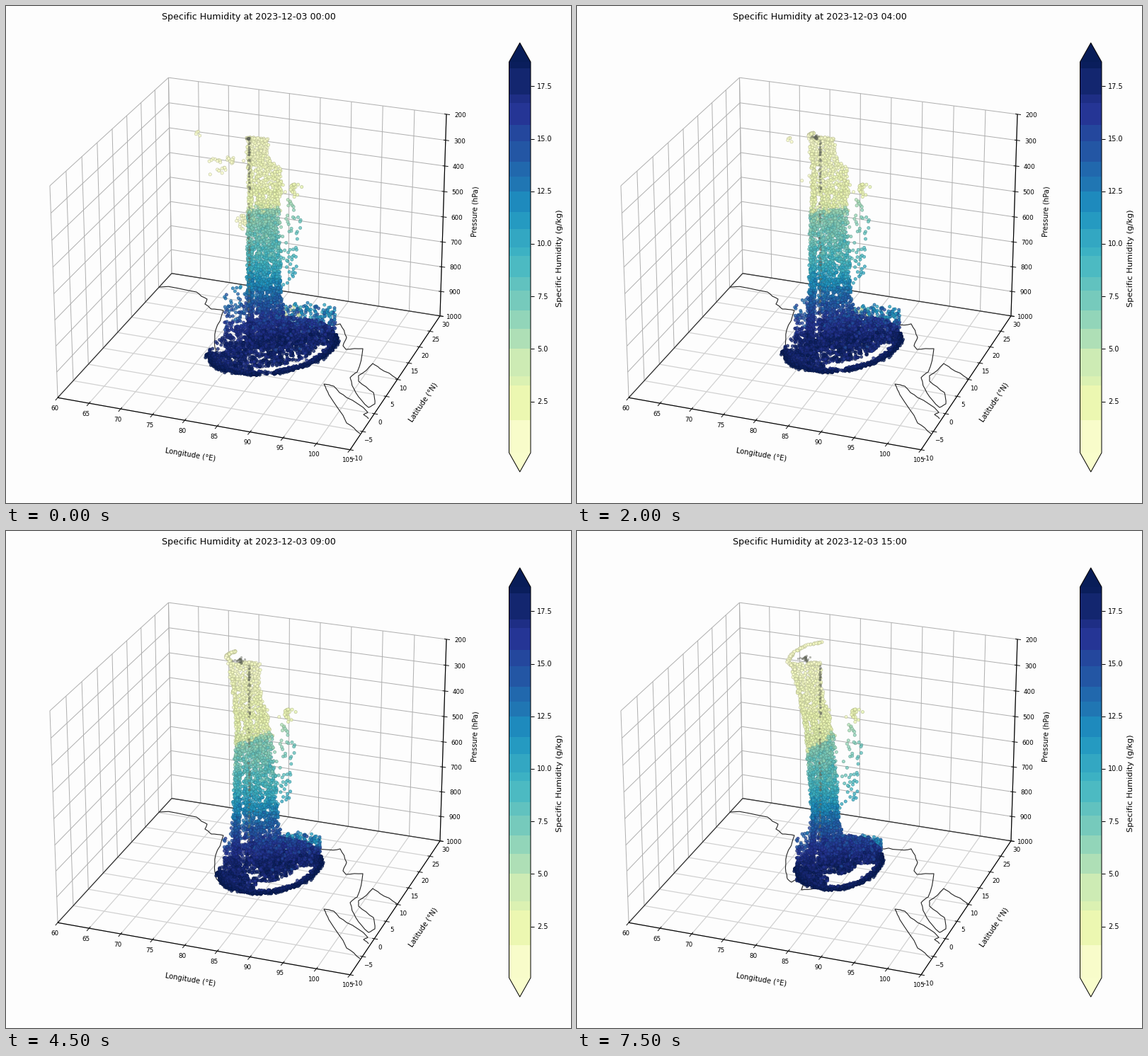
A matplotlib script that plays this animation: 798x702 px, repeating every 8000 ms.

```python
import numpy as np
import matplotlib.pyplot as plt
from matplotlib.animation import FuncAnimation

W, H, DPI = 798, 702, 64
PT = 72 / DPI  # points per pixel
HOURS, STEP = 16, 500
QMAX = 18.66
INK, GRID, FLOOR = "#111111", "#b0b0b0", "#d0d0d0"

fig = plt.figure(figsize=(W / DPI, H / DPI), dpi=DPI, facecolor="#fdfdfd")
ax = fig.add_axes([0, 0, 1, 1])
ax.set(xlim=(0, W), ylim=(H, 0))
ax.axis("off")
cmap = plt.get_cmap("YlGnBu")
rng = np.random.default_rng(12)


def shade(q):
    return cmap(np.clip(np.asarray(q) / QMAX, 0, 1))


def line(pts, color=INK, lw=1.0, z=1):
    x, y = np.transpose(pts)
    ax.plot(x, y, color=color, lw=lw * PT, zorder=z, solid_capstyle="butt")


def label(x, y, s, size, **kw):
    opts = dict(ha="center", va="center", color="black") | kw
    return ax.text(x, y, s, fontsize=size * PT, **opts)


# ---- perspective fitted to the seven visible corners of the box ----
def fit_camera(cube, pix):
    rows = []
    for p, (u, v) in zip(cube, np.array(pix) / 100):
        h = np.array([*p, 1.0])
        rows.append(np.r_[h, np.zeros(4), -u * h])
        rows.append(np.r_[np.zeros(4), h, -v * h])
    return np.linalg.svd(np.array(rows))[2][-1].reshape(3, 4)


CAM = fit_camera(
    [(0, 1, 1), (0, 0, 1), (1, 1, 1), (0, 1, 0), (0, 0, 0), (1, 1, 0), (1, 0, 0)],
    [(229.5, 101), (62, 254), (622, 153), (234, 378), (73, 553), (613, 437.5), (486, 627)])


def project(lon, lat, hpa):
    c = CAM @ [(lon - 60) / 45, (lat + 10) / 40, (1000 - hpa) / 800, 1]
    return c[:2] / c[2] * 100


def seg(p, q, *style, **kw):
    line([project(*p), project(*q)], *style, **kw)


LONS, LATS, HPAS = range(60, 106, 5), range(-10, 31, 5), range(200, 1001, 100)
for lon in LONS:
    seg((lon, 30, 200), (lon, 30, 1000), GRID)
    seg((lon, -10, 1000), (lon, 30, 1000), FLOOR, 1.2, z=0)
for lat in LATS:
    seg((60, lat, 200), (60, lat, 1000), GRID)
    seg((60, lat, 1000), (105, lat, 1000), FLOOR, 1.2, z=0)
for p in HPAS:
    seg((60, 30, p), (105, 30, p), GRID)
    seg((60, -10, p), (60, 30, p), GRID)
seg((60, 30, 1000), (105, 30, 1000), "#333333", 1.3)
seg((60, -10, 1000), (60, 30, 1000), "#333333", 1.2)
seg((60, -10, 1000), (105, -10, 1000), "black", 1.2)
seg((105, -10, 1000), (105, 30, 1000), "black", 1.2)
seg((105, 30, 1000), (105, 30, 200), "black", 1.2)


def tick(at, outward, text, shift):
    d = np.array(outward) / np.hypot(*outward)
    line([at - 3 * d, at + 5 * d])
    label(*(at + shift), text, 8.8)


for lon in LONS:
    tick(project(lon, -10, 1000), (-0.65, 0.76), f"{lon}", (-4, 15))
for lat in LATS:
    tick(project(105, lat, 1000), (0.98, 0.17), f"{lat}".replace("-", "−"), (8, 12.5))
for p in HPAS:
    tick(project(105, 30, p), (0.99, 0.13), f"{p}", (19.5, 1.5))

label(260.5, 634, "Longitude (°E)", 10, rotation=-9.5)
label(589, 560, "Latitude (°N)", 10, rotation=56)
label(663, 290, "Pressure (hPa)", 10, rotation=88)
title = label(342.5, 19, "", 12.65, va="baseline")


# ---- coastlines on the floor, roughened between a few points ----
def coast(*pts):
    pts = np.array(pts, float)
    for rough in (0.07, 0.06):
        d = np.diff(pts, axis=0)
        bump = rng.uniform(-rough, rough, (len(d), 1)) * d[:, ::-1] * (-1, 1)
        mid = pts[:-1] + d / 2 + bump
        out = np.empty((2 * len(pts) - 1, 2))
        out[::2], out[1::2] = pts, mid
        pts = out
    line(pts, "#222222", 1.1)


coast((216, 397), (269, 404), (284, 414), (281, 421), (290, 428), (307, 430),
      (296, 458), (295, 482), (297, 491), (303, 496), (318, 485))
coast((320, 499), (317, 507), (335, 505))
coast((428, 449), (452, 450), (472, 449), (481, 468), (476, 480), (480, 485), (504, 484),
      (496, 517), (486, 525), (494, 546), (512, 567), (521, 562), (519, 546), (498, 530),
      (498, 522), (518, 505), (528, 512), (553, 527))
coast((500, 604), (481, 589), (456, 549), (449, 534), (463, 537), (481, 553),
      (511, 574), (505, 577), (512, 583))

# ---- colour bar ----
X0, X1, XM = 710.5, 741, 725.75
BANDS = [631, 585, 536, 523, 484, 456, 430, 402, 383, 353, 341, 315, 291, 262, 241,
         220, 191, 168, 137, 125, 88, 79]


def q_at(y):
    return 2.5 + (558.5 - y) / 29.67


for lo, hi in zip(BANDS, BANDS[1:]):
    q = max(q_at((lo + hi) / 2), 0.9)
    ax.fill([X0, X1, X1, X0], [lo, lo, hi, hi], color=shade(q), lw=0)
ax.fill([X0, XM, X1], [79, 52, 79], color=shade(QMAX), lw=0)
ax.fill([X0, XM, X1], [631, 658, 631], color=shade(0.75), lw=0)
line([(X0, 79), (XM, 52), (X1, 79), (X1, 631), (XM, 658), (X0, 631), (X0, 79)], "black", z=3)
for k in range(1, 8):
    y = 558.5 - (k - 1) * 74.17
    line([(X1, y), (X1 + 4.5, y)], "black")
    label(750, y + 0.5, f"{2.5 * k:.1f}", 9.7, ha="left")
label(782, 356.5, "Specific Humidity (g/kg)", 11.4, rotation=90)

# ---- outline of the column: left and right edge by height and hour ----
KEYS = [0, 5, 9, 15]
EDGE_Y = [188, 212, 232, 290, 400, 480]
LEFT = np.array([[342] * 6,
                 [326, 328, 329, 327, 326, 318],
                 [315, 319, 321, 325, 322, 319],
                 [302, 309, 313, 324, 333, 327]])
RIGHT = np.array([[370, 368, 390, 386, 388, 400],
                  [361, 364, 382, 381, 386, 398],
                  [359, 357, 361, 376, 384, 395],
                  [344, 344, 348, 363, 369, 385]])
# wisp that curls away from the top
HOOK = np.array([[(342, 187)] * 5,
                 [(324, 170), (318, 172), (313, 175), (312, 178), (316, 184)],
                 [(346, 157), (325, 161), (305, 172), (298, 184), (308, 196)]])


def blend(keys, rows, t):
    i = min(np.searchsorted(keys, t, side="right") - 1, len(keys) - 2)
    f = (t - keys[i]) / (keys[i + 1] - keys[i])
    return rows[i] * (1 - f) + rows[i + 1] * f


def cloud(n):
    return rng.random(n), rng.random(n), rng.normal(size=n)


N_TOP, N_COL = 720, 2200
col_u, col_v, col_n = cloud(N_TOP + N_COL)
col_y = np.r_[187 + 104 * col_v[:N_TOP], 288 + 195 * col_v[N_TOP:]]
strand = rng.random(col_u.size) < 0.28
col_u = np.where(strand, 0.13 * col_u, 0.2 + 0.8 * col_u)
col_j = rng.normal(0, 1.3, col_u.size)


def column(t):
    left = np.interp(col_y, EDGE_Y, blend(KEYS, LEFT, t))
    right = np.interp(col_y, EDGE_Y, blend(KEYS, RIGHT, t))
    split = 285 + 26 * (1 - col_u) * t / 15 + 3 * col_n
    dry = np.interp(col_y, [186, 290], [0.9, 2.7]) + 0.3 * col_n
    wet = np.interp(col_y, [290, 350, 385, 410, 440, 475],
                    [6.4, 8.4, 11, 13.4, 16, 18]) + 0.6 * col_n
    return left + col_u * (right - left) + col_j, col_y, np.where(col_y < split, dry, wet)


def disc_shape(t):
    return 376 - 0.4 * t, 480 - 0.8 * t, 91 - 2.0 * t, 39 - 0.1 * t


def on_disc(t, th, r):
    cx, cy, a, b = disc_shape(t)
    dx = a * r * np.cos(th)
    return cx + dx, cy + b * r * np.sin(th) - 0.12 * dx


rim_u, rim_v, rim_n = cloud(620)
rim_th = np.radians(-8 + 188 * rim_u)


def rim(t):
    x, y = on_disc(t, rim_th, 0.97 + 0.035 * rim_n)
    keep = abs(x - 369 - 0.9 * t) > 9 - 0.85 * t
    return x[keep], y[keep], 18.2 + 0.4 * rim_n[keep]


in_u, in_v, in_n = cloud(1900)
in_deg, in_r = 360 * in_u, np.sqrt(in_v)


def inside(t):
    x, y = on_disc(t, np.radians(in_deg), in_r)
    eye = max(0, min(2 * (t - 3), 11))
    in_eye = np.hypot(x - 343 - 1.5 * (t - 5), (y - 481) * 1.2) < eye
    slot = (in_r > 0.75 - 0.02 * t) & (in_r < 0.9) & (in_deg > 15) & (in_deg < 112)
    bare = (in_deg > 182) & (in_deg < 245) & (in_r > 0.5) & (abs(in_n) > 0.3)
    keep = ~(in_eye | slot | bare)
    q = np.interp(y, [435, 470], [15.2, 17.6]) + 0.8 * in_n
    return x[keep], y[keep], q[keep]


lobe_u, lobe_v, lobe_n = cloud(430)


def lobe(t):
    cx, _, a, _ = disc_shape(t)
    top = 414 + 0.8 * t + 16 * abs(lobe_u - 0.55)
    y = top + (478 - t - top) * lobe_v ** 0.75
    q = np.interp(y, [415, 440, 468], [11, 12.6, 17]) + 1.3 * lobe_n
    q = np.where((lobe_u < 0.3) & (y < 440) & (lobe_n < -0.2) & (t < 8), 3.5, q)
    return cx + a * (0.2 + 0.78 * lobe_u), y, q


spire_u, spire_v, spire_n = cloud(240)


def spires(t):
    cx, _, a, _ = disc_shape(t)
    top = 396 + 30 * min(t / 7, 1)
    y = top + (497 - top) * spire_v ** 0.6
    off = -0.74 - 0.24 * t / 15 + 0.36 * spire_u
    return cx + a * off, y, np.interp(y, [395, 430, 475], [12.5, 14.2, 17.4]) + 0.6 * spire_n


hook_u, hook_v, hook_n = cloud(80)


def hook(t):
    pts = blend([0, 9, 15], HOOK, t)
    s = 4 * hook_u
    x, y = (np.interp(s, range(5), pts[:, k]) for k in (0, 1))
    return x + 0.8 * hook_n, y + 1.6 * (hook_v - 0.5), 1 + 0.3 * hook_n


row_u, _, row_n = cloud(40)


def top_row(t):
    x0, x1 = 342 - 1.1 * t, RIGHT[0, 0] - 1.7 * t
    x = x0 + row_u * (x1 - x0)
    return x, 187 + 0.8 * row_n + 0.15 * (x - 350) * (1 - t / 15), 1 + 0.2 * row_n


# x, y, spread x, spread y, count, last hour
STRAYS = [(272, 182, 2, 2, 5, 6), (290, 238, 1, 1, 1, 5), (313, 218, 12, 2, 22, 3),
          (305, 231, 4, 3, 8, 5), (334, 305, 3, 6, 24, 2)]
stray = np.array([(x + sx * rng.normal(), y + sy * rng.normal(), last)
                  for x, y, sx, sy, n, last in STRAYS for _ in range(n)])


def strays(t):
    x, y, last = stray[stray[:, 2] >= t].T
    return np.minimum(x + 40 * (1 - np.exp(-t / 3)), 342), y + 2.2 * t, np.full(x.size, 0.9)


out_u, out_v, out_n = cloud(78)


def outliers(t):
    y = 252 + 155 * out_v ** 1.5
    x = 404 - 0.95 * t + 6 * out_n - 0.03 * (y - 300) - 0.8 * t * (y > 380)
    q = np.where(y < 272, 2, np.interp(y, [272, 350, 405], [5.8, 8.5, 11]))
    return x, y, q + 0.4 * out_n


PARTS = [strays, outliers, spires, lobe, column, top_row, hook, inside, rim]

# thin dark core line and the grey knot at the top
core_y = np.r_[rng.uniform(190, 262, 38), rng.uniform(262, 440, 40)]
core_x = rng.normal(343, 0.5, core_y.size)
knot = rng.normal(size=(26, 2)) * (3, 1.8)

dots = ax.scatter([], [], s=(4.2 * PT) ** 2, linewidths=0.6 * PT, zorder=5)
marks = ax.scatter([], [], s=(2.4 * PT) ** 2, linewidths=0.5 * PT, zorder=6,
                   facecolors=[(0.55, 0.56, 0.48, 0.45)],
                   edgecolors=[(0.25, 0.27, 0.25, 0.55)])


def draw(t):
    x, y, q = (np.concatenate(v) for v in zip(*(part(t) for part in PARTS)))
    face = shade(q)
    edge = face.copy()
    edge[:, :3] *= 0.74
    face[:, 3], edge[:, 3] = 0.78, 0.85
    dots.set_offsets(np.c_[x, y])
    dots.set_facecolor(face)
    dots.set_edgecolor(edge)

    center = np.array([342 - 1.35 * t, 187 - 0.45 * t])
    size = min(1, 0.3 + t / 12)
    marks.set_offsets(np.r_[np.c_[core_x, core_y], center + knot * size])
    title.set_text(f"Specific Humidity at 2023-12-03 {t:02d}:00")
    return dots, marks, title


anim = FuncAnimation(fig, draw, frames=HOURS, interval=STEP, repeat=True,
                     repeat_delay=0, blit=False)
plt.show()
```
